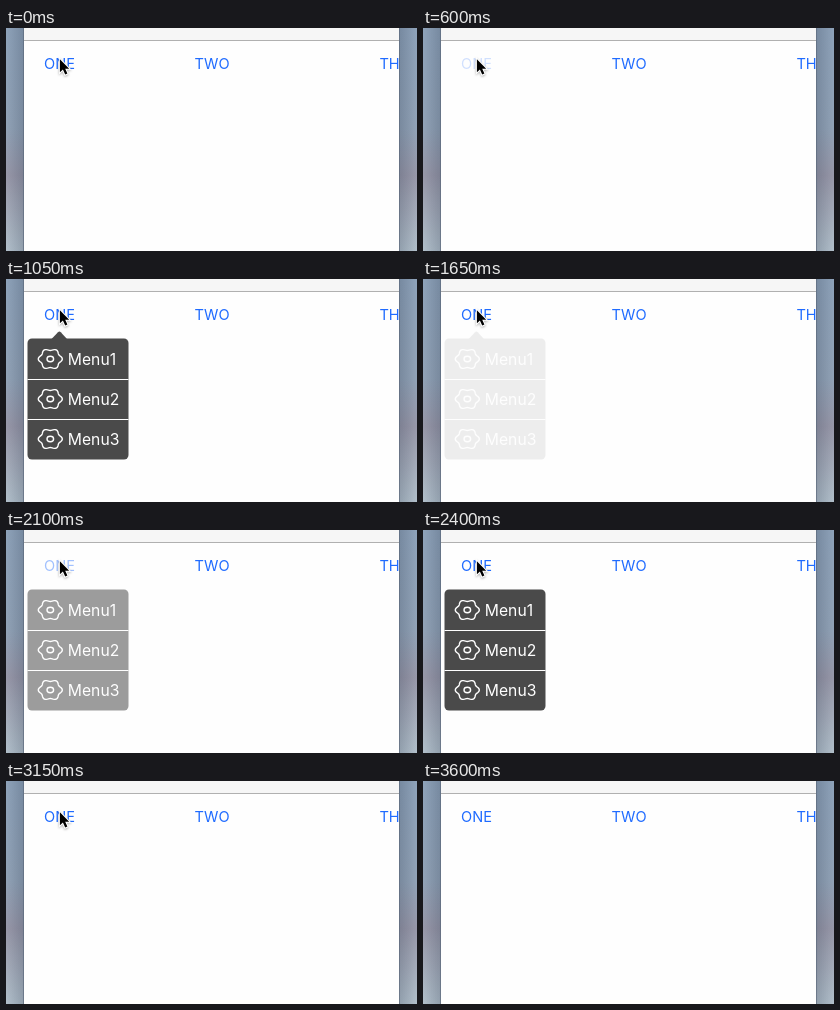
These frames come from a looping animation (411 by 223 pixels, 4.05 s). An HTML page:

```html
<!DOCTYPE html>
<html lang="en">
<head>
<meta charset="utf-8">
<title>Popup menu</title>
<style>
  html, body { margin: 0; width: 100%; height: 100%; overflow: hidden; background: #8a99ad; }
  svg { display: block; width: 411px; height: 223px; }
  text { font-family: Inter, Roboto, sans-serif; }
  .tab { font-size: 14.6px; fill: #1f6bff; }
  .item { font-size: 15.7px; fill: #fff; }
  .icon { fill: none; stroke: #fff; stroke-width: 1.4; }
</style>
</head>
<body>
<svg viewBox="0 0 411 223">
  <defs>
    <linearGradient id="wall" x2="0" y2="1">
      <stop offset="0" stop-color="#8fa3ba"/>
      <stop offset=".45" stop-color="#92a3b7"/>
      <stop offset=".66" stop-color="#9898a9"/>
      <stop offset="1" stop-color="#b2c0cb"/>
    </linearGradient>
    <linearGradient id="shade">
      <stop offset="0" stop-color="#1c2a40" stop-opacity="0"/>
      <stop offset="1" stop-color="#1c2a40" stop-opacity=".22"/>
    </linearGradient>
    <clipPath id="pane"><rect x="18" width="375" height="223"/></clipPath>
  </defs>

  <rect width="411" height="223" fill="url(#wall)"/>
  <rect width="18" height="223" fill="url(#shade)"/>
  <rect width="18" height="223" fill="url(#shade)" transform="translate(411) scale(-1 1)"/>
  <path d="M17.5 0V223M393.5 0V223" stroke="#5d6a7d" stroke-opacity=".7"/>
  <rect x="18" width="375" height="223" fill="#fefefe"/>
  <rect x="18" width="375" height="12" fill="#f6f6f6"/>
  <path d="M18 12.5H393" stroke="#b0b0b0"/>

  <g class="tab" clip-path="url(#pane)">
    <text id="one" x="38" y="41">ONE</text>
    <text x="188.6" y="41">TWO</text>
    <text x="373.4" y="41">THREE</text>
  </g>

  <g id="menu">
    <path id="arrow" d="M45.5 60L52 53.2Q53.4 51.8 54.8 53.2L61 60Z" fill="#4a4a4a"/>
    <rect x="21.5" y="59.5" width="101" height="121" rx="4.5" fill="#4a4a4a"/>
    <path d="M21.5 100.5H122.5M21.5 140.5H122.5" stroke="#fff"/>
    <g id="items"></g>
  </g>

  <path id="cursor" d="M0 0V13L3 10.3L5.3 15.4L7.5 14.4L5.3 9.5H9.3Z"
        stroke="#fff" stroke-width="2" paint-order="stroke"
        style="filter: drop-shadow(0 1px 1px rgba(0, 0, 0, .3))"/>
</svg>
<script>
const LOOP = 4050, TICK = 150;
const LEAVE = 3150;
const cycles = [
  { press: 600, hide: 1504, from: 0, rest: .085 },
  { press: 1950, hide: 2955, from: .085, rest: 0 }
];
const $ = id => document.getElementById(id);
const clamp = x => Math.min(1, Math.max(0, x));
const smooth = x => x * x * (3 - 2 * x);

// Six-lobed outline, slightly flattened.
function gear(cx, cy) {
  let d = "";
  for (let i = 0; i < 72; i++) {
    const a = i * Math.PI / 36;
    const r = 10.9 + 1.1 * Math.cos(6 * a);
    const x = cx + r * Math.cos(a), y = cy + .87 * r * Math.sin(a);
    d += (i ? "L" : "M") + x.toFixed(2) + " " + y.toFixed(2);
  }
  return `<path class="icon" d="${d}Z"/>
    <ellipse class="icon" cx="${cx}" cy="${cy}" rx="3.3" ry="2.7"/>`;
}

$("items").innerHTML = [1, 2, 3].map(n => {
  const y = 40 + 40 * n;
  return gear(44.3, y) + `<text class="item" x="61.8" y="${y + 5.8}">Menu${n}</text>`;
}).join("");

function menuLevel(c, t) {
  if (t < c.press) return 0;
  if (t < c.hide) return c.from + (1 - c.from) * clamp((t - c.press) / 300);
  return Math.max(c.rest, 1 - clamp((t - c.hide) / 160));
}

function draw(time) {
  const t = Math.floor(time / TICK) * TICK;
  const second = t >= cycles[1].press;
  const cycle = cycles[second ? 1 : 0];
  const since = t - cycle.press;
  $("one").setAttribute("opacity", since < 0 ? 1 : .2 + .8 * smooth(clamp(since / 450)));
  $("menu").setAttribute("opacity", menuLevel(cycle, t));
  // The arrow fades with the first menu; the second opens without one.
  $("arrow").setAttribute("visibility", second && since > 0 ? "hidden" : "visible");

  // The pointer speeds away past the lower edge.
  const go = Math.pow(Math.max(0, t - LEAVE) / TICK, 2.4);
  $("cursor").setAttribute("transform", `translate(${53.9 + 28 * go} ${31.2 + 23.2 * go})`);
}

const begin = performance.now();
function tick() {
  draw((performance.now() - begin) % LOOP);
  requestAnimationFrame(tick);
}
tick();
</script>
</body>
</html>
```
